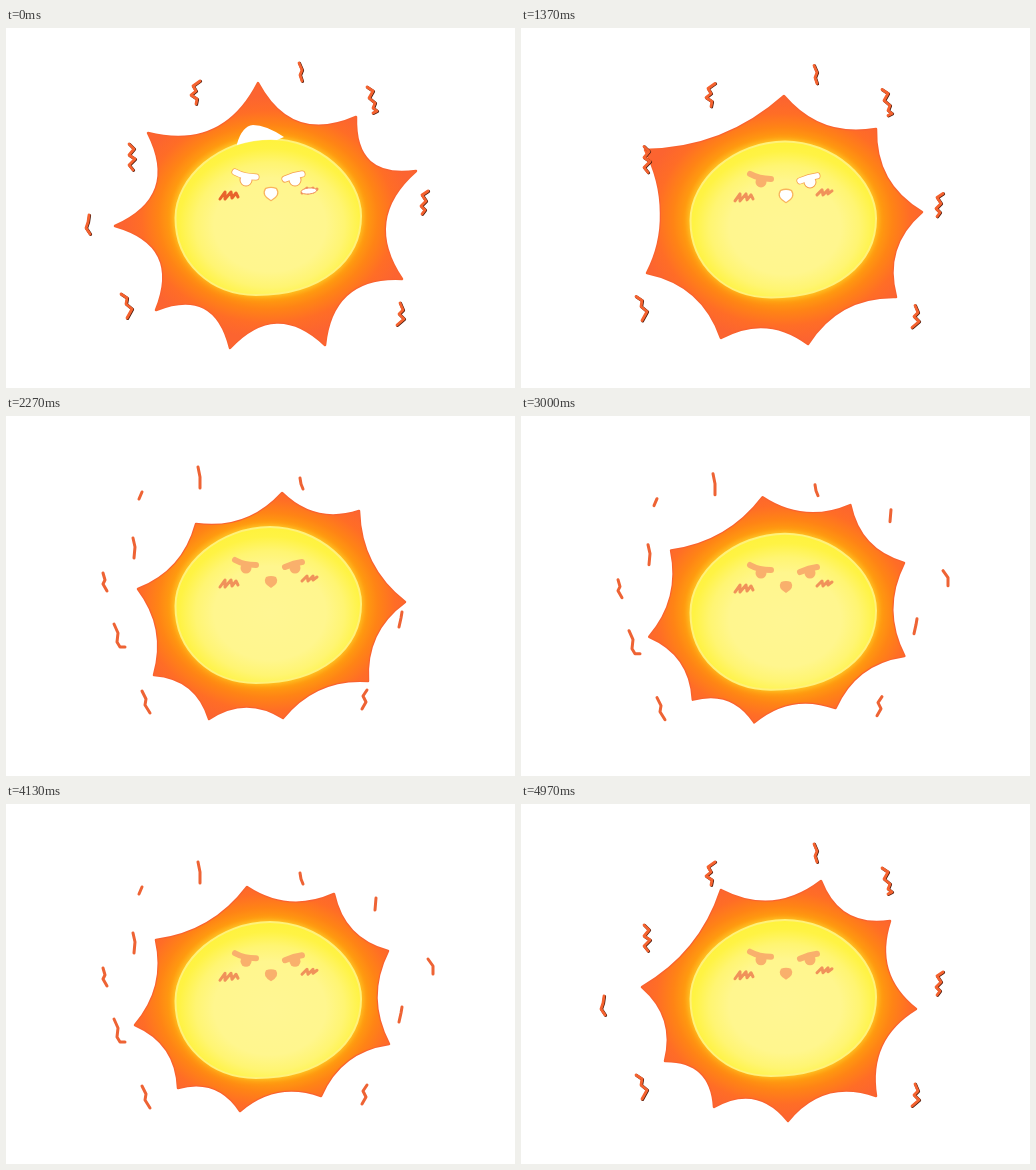
Write an HTML page with a canvas that moves like this. It is 509 px wide and 360 px high and loops after 5 s.

```html
<!DOCTYPE html>
<html lang="en">
<head>
<meta charset="utf-8">
<title>Blazing sun</title>
<style>
html, body { margin: 0; width: 100%; height: 100%; overflow: hidden; background: #fff; }
canvas { display: block; }
</style>
</head>
<body>
<canvas id="stage" width="509" height="360"></canvas>
<script>
const ctx = document.getElementById('stage').getContext('2d');
const LOOP = 5000, FPS = 25, CYCLE = 29;

// Each pose: phase, then [bob, edge depth, depth around the 8th tip, tip x, tip y, ...]
const poses = [
  [0, [0, 24, 26, 252,55, 350,89, 410,143, 396,251, 319,317, 224,320, 150,282, 109,198, 142,105]],
  [5, [2.5, 14, 4, 263,68, 355,101, 401,184, 375,269, 287,316, 200,310, 126,245, 140,185, 124,122]],
  [8, [5, 16, 12, 300,77, 369,117, 395,205, 355,292, 267,317, 193,303, 144,257, 121,183, 200,86]],
  [16, [7, 12, 11, 328,90, 382,147, 383,240, 315,292, 234,307, 172,284, 129,221, 150,136, 241,83]],
  [18, [6, 12, 11, 327,87, 382,143, 385,236, 318,291, 236,306, 174,285, 129,224, 148,137, 238,81]],
  [27, [0, 12, 11, 276,77, 353,95, 399,186, 362,265, 277,302, 203,303, 148,259, 132,173, 190,108]]
];

const paths = list => list.map(d => new Path2D(d));
const zigzags = paths([
  'M194 53L187 58 190 63 185 67 191 71 190 76',
  'M293 35L296 42 294 47 296 53',
  'M361 59L367 63 363 70 369 75 367 80 371 83 367 85',
  'M422 163L416 167 420 173 415 178 419 182 416 186',
  'M394 275L397 282 393 286 398 291 391 297',
  'M115 266L121 270 120 276 126 281 121 290',
  'M123 116L128 121 123 127 129 131 123 137 127 142',
  'M83 187L82 194 80 200 84 206'
]);
const wisps = paths([
  'M192 57L194 67 194 78', 'M294 68L295 74 297 79', 'M136 82L133 89',
  'M127 128L129 137 128 148', 'M97 163L99 170 97 174 101 181',
  'M108 214L112 223 111 232 114 237 119 237', 'M136 281L140 289 139 295 144 303',
  'M361 280L357 286 360 292 356 299', 'M396 202L395 208 393 217',
  'M422 154L427 161 427 169', 'M370 93L369 105'
]);
const body = new Path2D('M169.5 190C169.5 149 214 111 264 111C312 111 355 149 355 188' +
  'C355 232 316 267 250 267C205 267 169.5 235 169.5 190Z');
const [browL, browR, scribbleL, scribbleR, mouth, gap] = paths([
  'M229 144Q238 149 250 149', 'M296 146Q288 147 279 151',
  'M214 171L219 164 219 171 225 164 226 170 230 165 232 169',
  'M296 165L301 160 302 165 307 160 307 164 311 161',
  'M260 161Q265 159 270 161Q274 167 265 172Q256 167 260 161Z',
  'M231 116Q236 98 247 97Q260 97 278 109L271 112Q250 111 231 117Z'
]);

function poseAt(phase) {
  const n = poses.length;
  const key = i => {
    const turn = Math.floor(i / n), [p, v] = poses[i - turn * n];
    return [p + turn * CYCLE, v];
  };
  let i = n - 1;
  while (poses[i][0] > phase) i--;
  const [[t0, a], [t1, b], [t2, c], [t3, d]] = [i - 1, i, i + 1, i + 2].map(key);
  const h = t2 - t1, u = (phase - t1) / h, w = 1 - u;
  return b.map((v, j) => {
    const m1 = (c[j] - a[j]) / (t2 - t0) * h, m2 = (d[j] - v) / (t3 - t1) * h;
    return v * (1 + 2 * u) * w * w + m1 * u * w * w + c[j] * u * u * (3 - 2 * u) - m2 * u * u * w;
  });
}

function gradient(radius, stops) {
  const g = ctx.createRadialGradient(0, 0, 0, 0, 0, radius);
  stops.forEach(([r, color]) => g.addColorStop(r / radius, color));
  return g;
}

// Fills a shape with a gradient measured in units of the sun's oval.
function glow(shape, cx, cy, radius, stops) {
  ctx.save();
  ctx.clip(shape);
  ctx.translate(cx, cy);
  ctx.scale(93, 78);
  ctx.fillStyle = gradient(radius, stops);
  ctx.fillRect(-4, -4, 8, 8);
  ctx.restore();
}

function line(path, width, color) {
  ctx.lineWidth = width;
  ctx.strokeStyle = color;
  ctx.stroke(path);
}

function drawRays([bob, depth, depth8, ...tips]) {
  const shape = new Path2D();
  shape.moveTo(tips[0], tips[1]);
  for (let i = 0; i < 9; i++) {
    const j = (i + 1) % 9;
    const x = tips[2 * i], y = tips[2 * i + 1], X = tips[2 * j], Y = tips[2 * j + 1];
    const k = 2 * (i === 6 || i === 7 ? depth8 : depth) / Math.hypot(X - x, Y - y);
    shape.quadraticCurveTo((x + X) / 2 - (Y - y) * k, (y + Y) / 2 + (X - x) * k, X, Y);
  }
  shape.closePath();
  line(shape, 2.5, '#f9622e');
  glow(shape, 262, 189 + bob, 1.8,
    [[0.97, '#ffb81c'], [1.06, '#ff9a10'], [1.18, '#ff8415'], [1.36, '#ff6d26'], [1.55, '#fc6430']]);
}

function drawBody(bob) {
  ctx.save();
  ctx.translate(0, bob);
  ctx.shadowColor = '#ffd22c';
  ctx.shadowBlur = 7;
  ctx.fillStyle = '#fff046';
  ctx.fill(body);
  ctx.shadowBlur = 0;
  glow(body, 264, 197, 1.15,
    [[0, '#fff693'], [0.6, '#fff68e'], [0.8, '#fff572'], [0.98, '#fff344'], [1.1, '#fff23c']]);
  line(body, 2, '#fff17a');
  ctx.restore();
}

function drawEye(brow, x, y, blank) {
  const eye = new Path2D();
  eye.arc(x, y, 5.5, 0, 7);
  if (blank) {
    line(brow, 7, '#f5a04c');
    line(eye, 2, '#f5a04c');
  }
  const color = blank ? '#fff' : '#f9b06c';
  line(brow, blank ? 5.5 : 6, color);
  ctx.fillStyle = color;
  ctx.fill(eye);
}

function drawFace(bob, phase) {
  const wide = phase < 3, some = phase < 7;
  ctx.save();
  ctx.translate(0, bob * 0.75);
  drawEye(browL, 240, 152, wide);
  drawEye(browR, 289, 152, some);
  ctx.fillStyle = some ? '#fff' : '#f9b06c';
  if (some) line(mouth, 2.5, '#f9b45c');
  ctx.fill(mouth);
  line(scribbleL, 3, wide ? '#e8642c' : '#f0925a');
  line(scribbleR, 3, '#f0925a');
  if (wide) {
    ctx.beginPath();
    ctx.ellipse(303, 163, 8, 3, -0.1, 0, 7);
    ctx.fillStyle = '#fff';
    ctx.fill();
    ctx.lineWidth = 1;
    ctx.stroke();
  }
  ctx.restore();
  if (wide) {
    ctx.fillStyle = '#fff';
    ctx.fill(gap);
  }
}

function drawMarks(bob, phase) {
  const thin = phase >= 15 && phase < 20 || phase >= 26;
  ctx.save();
  ctx.translate(0, thin ? bob - 6 : bob);
  if (thin) {
    wisps.forEach((mark, i) => {
      if (i === 9 && phase > 25 || i === 10 && phase > 17) return;
      line(mark, 3, '#ee6334');
    });
  } else {
    if (phase >= 20) {
      ctx.translate(-2, -13);
      ctx.scale(1.024, 1.02);
    }
    zigzags.forEach((mark, i) => {
      if (i === 7 && phase > 2 && phase < 7) return;
      ctx.save();
      ctx.translate(0.6, 0.4);
      line(mark, 3, '#4a1a0c');
      ctx.restore();
      line(mark, 2.8, '#f5622f');
    });
  }
  ctx.restore();
}

function draw(time) {
  const phase = Math.floor(time % LOOP * FPS / 1000) % CYCLE;
  const pose = poseAt(phase), bob = pose[0];
  ctx.fillStyle = '#fff';
  ctx.fillRect(0, 0, 509, 360);
  drawRays(pose);
  drawBody(bob);
  drawFace(bob, phase);
  drawMarks(bob, phase);
}

ctx.lineCap = ctx.lineJoin = 'round';
const start = performance.now();
function tick() {
  draw(performance.now() - start);
  requestAnimationFrame(tick);
}
tick();
</script>
</body>
</html>
```
